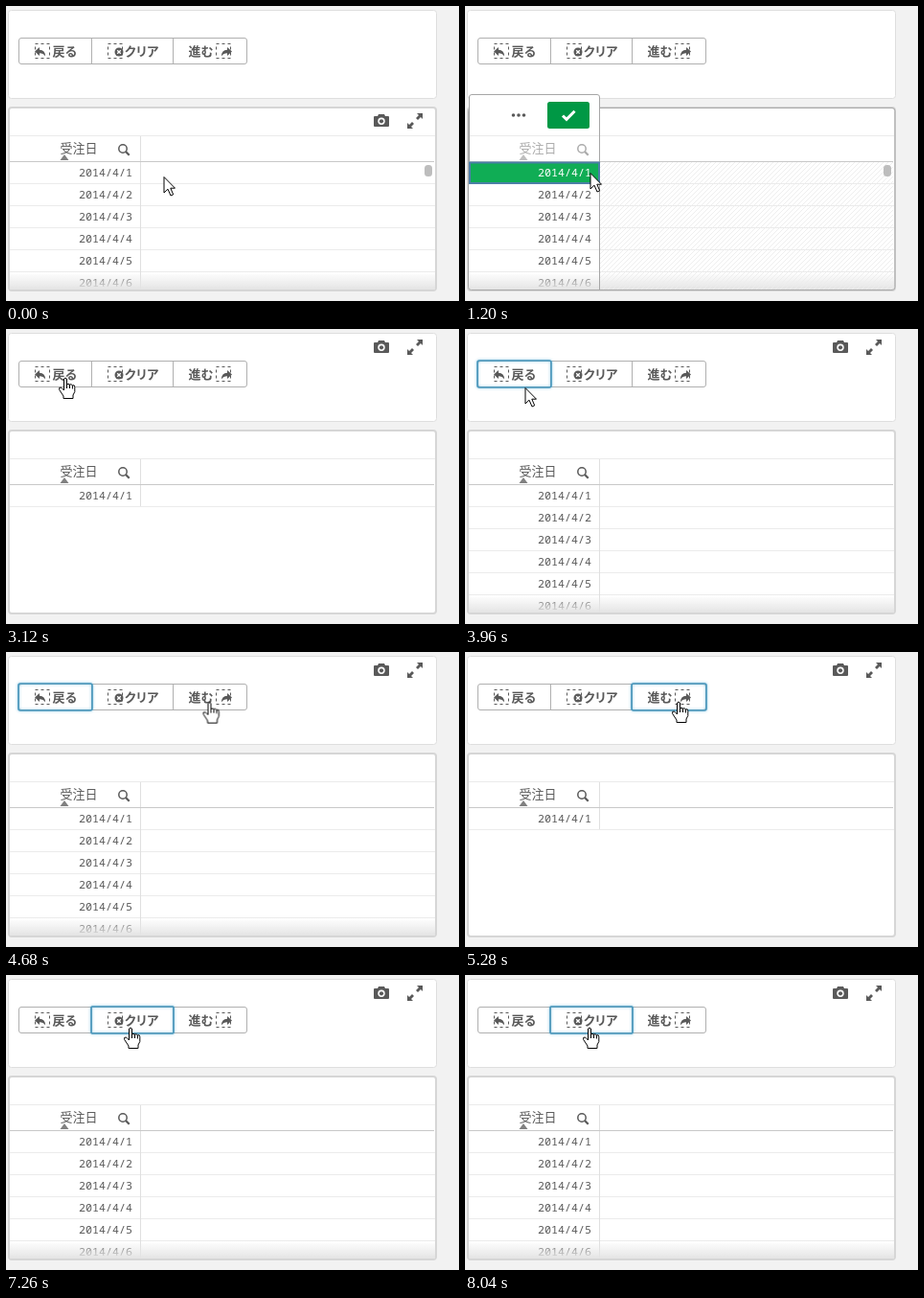
Recreate the animation shown at these times as an HTML page. Size 473 px wide and 308 px high, loop 8100 ms.

```html
<!DOCTYPE html>
<html lang="ja">
<head>
<meta charset="utf-8">
<title>選択の操作</title>
<style>
html, body { margin: 0; width: 100%; height: 100%; overflow: hidden; background: #f2f2f2; }
svg { display: block; width: 473px; height: 308px; }
text { fill: #595959; font: 13px "Noto Sans CJK JP", "Noto Sans CJK", sans-serif; }
.date { font: 11.67px "Noto Sans Mono", monospace; text-anchor: end; }
.label { font-weight: 700; }
.tight { letter-spacing: -1.4px; }
.line { fill: none; stroke: #ebebeb; }
.ink { fill: #595959; }
.box { fill: none; stroke: #595959; stroke-dasharray: 3 3; }
.focus { fill: none; stroke: #4595bb; stroke-width: 1.6; filter: drop-shadow(0 0 1.5px #7cc0e0); }

/* Every part shares one 8.1 s clock */
.anim { animation: 8.1s step-end infinite; }
#rows { animation-name: rows; }
#picker { animation-name: picker; }
#tableTools { animation-name: tableTools; animation-timing-function: linear; }
#buttonTools { animation-name: buttonTools; animation-timing-function: linear; }
#thumb { animation-name: thumb; }
#backFocus { animation-name: backFocus; }
#nextFocus { animation-name: nextFocus; }
#clearFocus { animation-name: clearFocus; }
#arrow { animation-name: arrow; }
#hand { animation-name: hand; }
#pointer { animation-name: move; animation-timing-function: ease-in-out; }

@keyframes rows {
  0%, 40%, 86.667%, 100% { opacity: 1; }
  25.185%, 62.222% { opacity: 0; }
}
@keyframes picker {
  0%, 25.185%, 100% { opacity: 0; }
  11.111% { opacity: 1; }
}
@keyframes thumb {
  0% { opacity: 1; }
  25.185%, 100% { opacity: 0; }
}
@keyframes tableTools {
  0%, 11.1% { opacity: 1; }
  11.111%, 25.185% { opacity: 0; }
  28.148%, 30.37% { opacity: 1; }
  32%, 100% { opacity: 0; }
}
@keyframes buttonTools {
  0%, 30.37% { opacity: 0; }
  33.333%, 100% { opacity: 1; }
}
@keyframes backFocus {
  0%, 62.222%, 100% { opacity: 0; }
  40% { opacity: 1; }
}
@keyframes nextFocus {
  0%, 86.667%, 100% { opacity: 0; }
  62.222% { opacity: 1; }
}
@keyframes clearFocus {
  0% { opacity: 0; }
  86.667%, 100% { opacity: 1; }
}
@keyframes arrow {
  0%, 25.185%, 48.148%, 100% { opacity: 1; }
  20%, 34.074%, 52.593% { opacity: 0; }
}
@keyframes hand {
  0%, 25.185%, 48.148% { opacity: 0; }
  20%, 34.074%, 52.593%, 100% { opacity: 1; }
}
@keyframes move {
  0%, 3.7% { transform: translate(165px, 178px); }
  10%, 16% { transform: translate(131px, 174px); }
  20.74%, 25.185% { transform: translate(110px, 114px); }
  27%, 27.6% { transform: translate(116px, 116px); }
  35.5%, 42% { transform: translate(62px, 51px); }
  48.5%, 50% { transform: translate(63px, 61px); }
  59.5%, 66% { transform: translate(223px, 52px); }
  76%, 81% { transform: translate(131px, 58px); }
  85%, 100% { transform: translate(130px, 55px); }
}
#arrow { animation-timing-function: step-end; }
</style>
</head>
<body>
<svg viewBox="0 0 473 308">
  <defs>
    <pattern id="hatch" width="5" height="5" patternUnits="userSpaceOnUse">
      <path d="M-1 6L6 -1M-1 1L1 -1M4 6L6 4" stroke="#ececec" stroke-width=".9"/>
    </pattern>
    <linearGradient id="shade" x2="0" y2="1">
      <stop stop-color="#e4e4e4" stop-opacity="0"/>
      <stop offset="1" stop-color="#e4e4e4"/>
    </linearGradient>
    <g id="tools" class="ink">
      <path d="M1 3H4L5 1H11L12 3H15Q16 3 16 4V13Q16 14 15 14H1Q0 14 0 13V4Q0 3 1 3Z"/>
      <circle cx="8" cy="8.3" r="3.7" fill="#fff"/>
      <circle cx="8" cy="8.3" r="2.1"/>
      <path d="M45 0H51V6L49 4L46 7L44 5L47 2ZM41 16H35V10L37 12L40 9L42 11L39 14Z"/>
    </g>
    <g id="heading">
      <text x="56.5" y="153">受注日</text>
      <path d="M56.5 161L61 155L65.5 161Z" fill="#808080"/>
      <g fill="none" stroke="#595959">
        <circle cx="122" cy="149" r="4.2" stroke-width="1.5"/>
        <path d="M125.2 152.2L128.7 155.7" stroke-width="2.2"/>
      </g>
    </g>
    <path id="reply" class="ink" d="M30 47.5L35 43V45.7Q41 45.7 41 52.5Q39 49.3 35 49.3V52Z"/>
  </defs>

  <rect x="2.5" y="4.5" width="447" height="92" rx="3" fill="#fff" stroke="#dedede"/>
  <rect x="3" y="106" width="446" height="191" rx="3" fill="#fff" stroke="#d6d6d6" stroke-width="2"/>

  <!-- Buttons -->
  <rect x="13.5" y="33.5" width="238" height="27" rx="2.5" fill="#fff" stroke="#b0b0b0"/>
  <path d="M89.5 34V60M174.5 34V60" stroke="#b0b0b0"/>
  <path class="box" d="M30.5 39.5h15v15h-15zM106.5 39.5h15v15h-15zM219.5 39.5h15v15h-15z"/>
  <use href="#reply"/>
  <use href="#reply" transform="translate(266 0) scale(-1 1)"/>
  <circle class="ink" cx="118" cy="48" r="4.5"/>
  <path d="M116.2 46.2l3.6 3.6m0-3.6l-3.6 3.6" stroke="#fff" stroke-width="1.3"/>
  <text class="label" x="48.5" y="52">戻る</text>
  <text class="label tight" x="123.5" y="52">クリア</text>
  <text class="label" x="190.5" y="52">進む</text>
  <rect id="backFocus" class="anim focus" x="13" y="33" width="77" height="28" rx="2"/>
  <rect id="clearFocus" class="anim focus" x="89" y="33" width="86" height="28" rx="1"/>
  <rect id="nextFocus" class="anim focus" x="174" y="33" width="78" height="28" rx="2"/>
  <g id="buttonTools" class="anim"><use href="#tools" x="384" y="11"/></g>

  <!-- Table -->
  <path class="line" d="M4 135.5H448M4 185.5H448"/>
  <path d="M140.5 136V185" stroke="#e0e0e0"/>
  <path d="M4 162.5H447" stroke="#c8c8c8"/>
  <use href="#heading"/>
  <text class="date" x="132" y="178">2014/4/1</text>
  <g id="rows" class="anim">
    <path class="line" d="M4 208.5H448M4 231.5H448M4 254.5H448M4 277.5H448"/>
    <path d="M140.5 185V296" stroke="#e0e0e0"/>
    <text class="date" x="132" y="201">2014/4/2</text>
    <text class="date" x="132" y="224">2014/4/3</text>
    <text class="date" x="132" y="247">2014/4/4</text>
    <text class="date" x="132" y="270">2014/4/5</text>
    <text class="date" x="132" y="293">2014/4/6</text>
    <rect x="4" y="278" width="444" height="18" fill="url(#shade)"/>
  </g>
  <g id="tableTools" class="anim"><use href="#tools" x="384" y="112"/></g>

  <!-- Open selection -->
  <g id="picker" class="anim">
    <rect x="141" y="163" width="306" height="133" fill="url(#hatch)"/>
    <rect x="3.5" y="106.5" width="445.5" height="190" rx="3" fill="none" stroke="#aaa"/>
    <path d="M140.5 162V296" stroke="#a6a6a6"/>
    <path d="M4.5 162.5V95Q4.5 92.5 7 92.5H138Q140.5 92.5 140.5 95V162.5" fill="#fff" stroke="#a6a6a6"/>
    <path class="line" d="M5 135.5H140"/>
    <path d="M5 162.5H140" stroke="#c8c8c8"/>
    <g class="ink">
      <circle cx="50.5" cy="114" r="1.8"/>
      <circle cx="56" cy="114" r="1.8"/>
      <circle cx="61.5" cy="114" r="1.8"/>
    </g>
    <rect x="86" y="100" width="44" height="28" rx="2.5" fill="#009845"/>
    <path d="M102 114.5L106 118.3L114.5 109.8" fill="none" stroke="#fff" stroke-width="3"/>
    <g opacity=".5"><use href="#heading"/></g>
    <rect x="5" y="163.5" width="135" height="21.5" fill="#10ad55" stroke="#4b7fa6" stroke-width="2"/>
    <text class="date" x="132" y="178" style="fill:#fff">2014/4/1</text>
  </g>
  <rect id="thumb" class="anim" x="437" y="166" width="8" height="12" rx="3.5" fill="#bdbdbd"/>

  <!-- Cursor -->
  <g id="pointer" class="anim" fill="#fff" stroke="#000" stroke-linejoin="round">
    <path id="arrow" class="anim" d="M0 .5V17L4 13.2L7 20L9.7 18.8L6.8 12.2H11.5Z"/>
    <g id="hand" class="anim">
      <path d="M-1.5 1Q0 -1 1.5 1V7Q3 5.5 4.5 7Q6 6 7.4 7.8Q9.8 7 9.8 9.5V14.5L8 18V21.5H-2V19L-6.3 12.5Q-7.2 9.5 -4.5 10L-1.5 13Z"/>
      <path d="M1.5 7V11M4.5 7V11M7.4 8V11.5" fill="none"/>
    </g>
  </g>
</svg>
</body>
</html>
```
